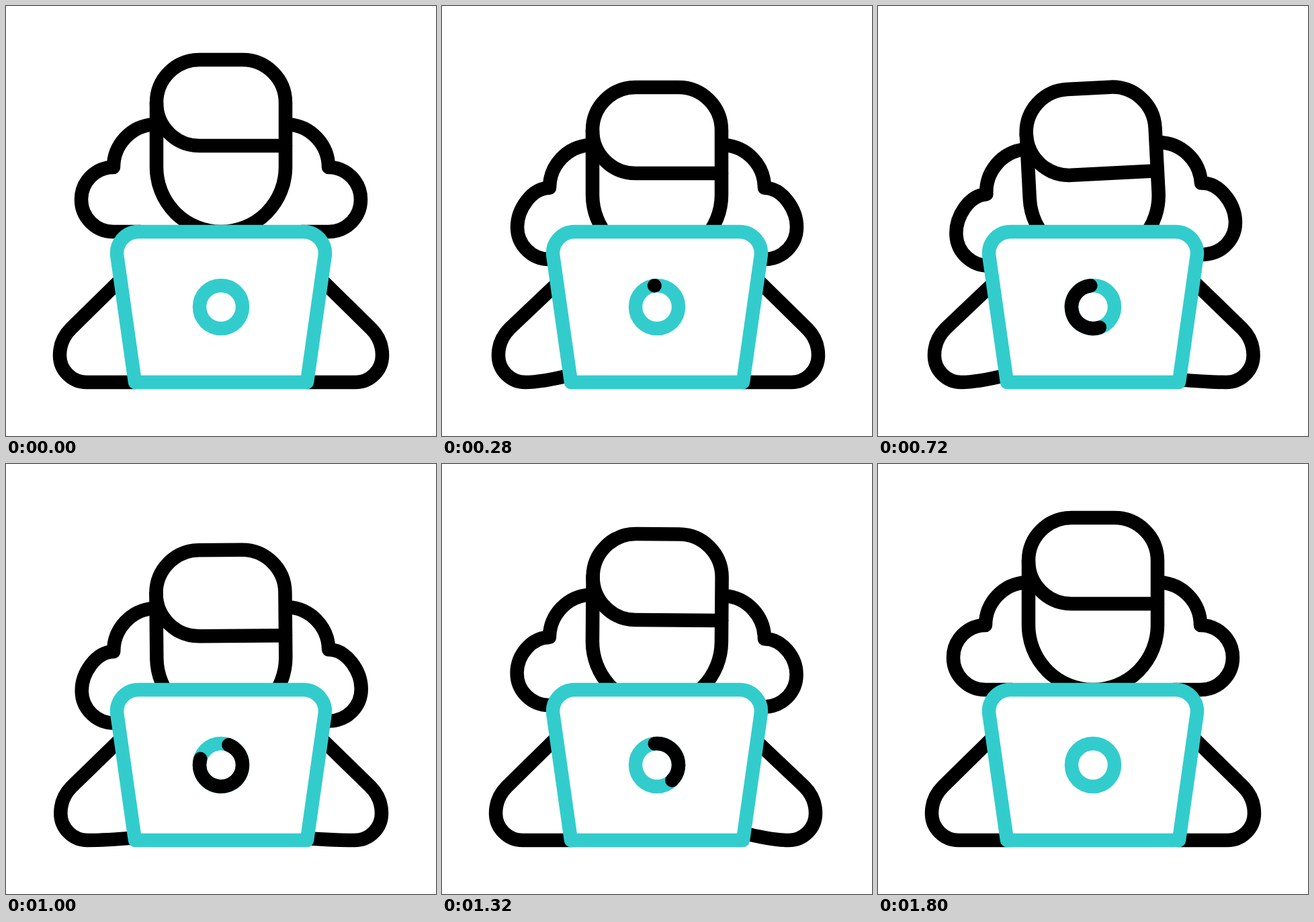
An HTML page that plays this animation: 640 px wide and 640 px high, repeating every 2000 ms.

```html
<!DOCTYPE html>
<html>
<head>
<meta charset="utf-8">
<style>
  html, body { margin: 0; height: 100%; overflow: hidden; background: #fff; }
  svg { display: block; width: 100vw; height: 100vh; }
  path, circle { fill: none; stroke: #000; stroke-width: 20.5; stroke-linecap: round; stroke-linejoin: round; }
  .teal { stroke: #3cc; }
</style>
</head>
<body>
<svg viewBox="0 0 640 640">
  <path id="leftArm"/>
  <path id="rightArm" transform="matrix(-1 0 0 1 640 0)"/>
  <g id="figure">
    <path id="leftHair"/>
    <path id="rightHair" transform="matrix(-1 0 0 1 640 0)"/>
    <g id="head">
      <path d="M288 80H352A64 64 0 0 1 416 144V240A96 96 0 0 1 224 240V144A64 64 0 0 1 288 80Z"/>
      <path d="M224 144A64 64 0 0 0 288 208H416"/>
    </g>
  </g>
  <path class="teal" style="fill:#fff" d="M192 560L165.4 372.5A32 32 0 0 1 197 336H443A32 32 0 0 1 474.6 372.5L448 560Z"/>
  <circle class="teal" cx="320" cy="448" r="32"/>
  <path id="spinner"/>
</svg>
<script>
const LOOP = 2000, STEP = 40;
const el = id => document.getElementById(id);
const draw = (id, d) => el(id).setAttribute('d', d);
const move = (id, value) => el(id).setAttribute('transform', value);

// Eased progress from 0 to 1 between two times
function ease(t, from, to) {
  const u = Math.min(1, Math.max(0, (t - from) / (to - from)));
  return u * u * (3 - 2 * u);
}

// Eased value through [time, value] keys
function keyed(t, keys) {
  let value = keys[0][1];
  for (let i = 1; i < keys.length; i++)
    value += (keys[i][1] - keys[i - 1][1]) * ease(t, keys[i - 1][0], keys[i][0]);
  return value;
}

// One smooth pulse between each pair of rest times
function pulse(t, rests) {
  const i = rests.findIndex(r => r > t);
  if (i < 1) return 0;
  const u = (t - rests[i - 1]) / (rests[i] - rests[i - 1]);
  return (1 - Math.cos(2 * Math.PI * u)) / 2;
}

const arm = a => `M172 ${406 + 6.5 * a}L${96.4 + 4 * a} 480.4
  A56 56 0 0 0 ${80 + 4 * a} 520A40 40 0 0 0 ${120 + 4 * a} 560
  C${140 + 4 * a} 560 168 ${560 - 5 * a} 192 ${560 - 11 * a}`;

function hair(sink) {
  const top = 0.75 * sink, low = sink;
  return `M220 ${176.2 + top}A64 64 0 0 0 160 ${240 + top}
    C133.5 ${240 + top} 112 ${261.5 + low} 112 ${288 + low}
    A48 48 0 0 0 160 ${336 + low}H200`;
}

// Counter-clockwise arc, angles in degrees from the top
function arc(from, to) {
  const point = deg => {
    const a = deg * Math.PI / 180;
    return `${320 - 32 * Math.sin(a)} ${448 - 32 * Math.cos(a)}`;
  };
  const mid = (from + to) / 2;
  return `M${point(from)}A32 32 0 0 0 ${point(mid)}A32 32 0 0 0 ${point(to)}`;
}

function render(t) {
  draw('leftArm', arm(pulse(t, [40, 490, 920, 1330, 1720])));
  draw('rightArm', arm(pulse(t, [270, 630, 1075, 1540])));

  const sink = 41 * (ease(t, 40, 280) - ease(t, 1200, 1440));
  const nod = keyed(t, [[600, 0], [1080, 7.6], [1560, 0]]);
  const tilt = keyed(t, [[510, 0], [740, -3.05], [1200, 1.2], [1400, 0]]);
  draw('leftHair', hair(sink));
  draw('rightHair', hair(sink));
  move('head', `translate(0 ${sink})`);
  move('figure', `translate(0 ${nod}) rotate(${tilt} 320 249)`);

  const tail = ease(t, 700, 1785), tip = ease(t, 250, 1150);
  draw('spinner', tip > tail ? arc(6 + 360 * tail, 6 + 360 * tip)
    : t < 1800 && tail > 0 ? arc(365.9, 366) : '');
}

const start = performance.now();
function tick() {
  const t = (performance.now() - start) % LOOP;
  render(Math.floor(t / STEP) * STEP);
  requestAnimationFrame(tick);
}
tick();
</script>
</body>
</html>
```
